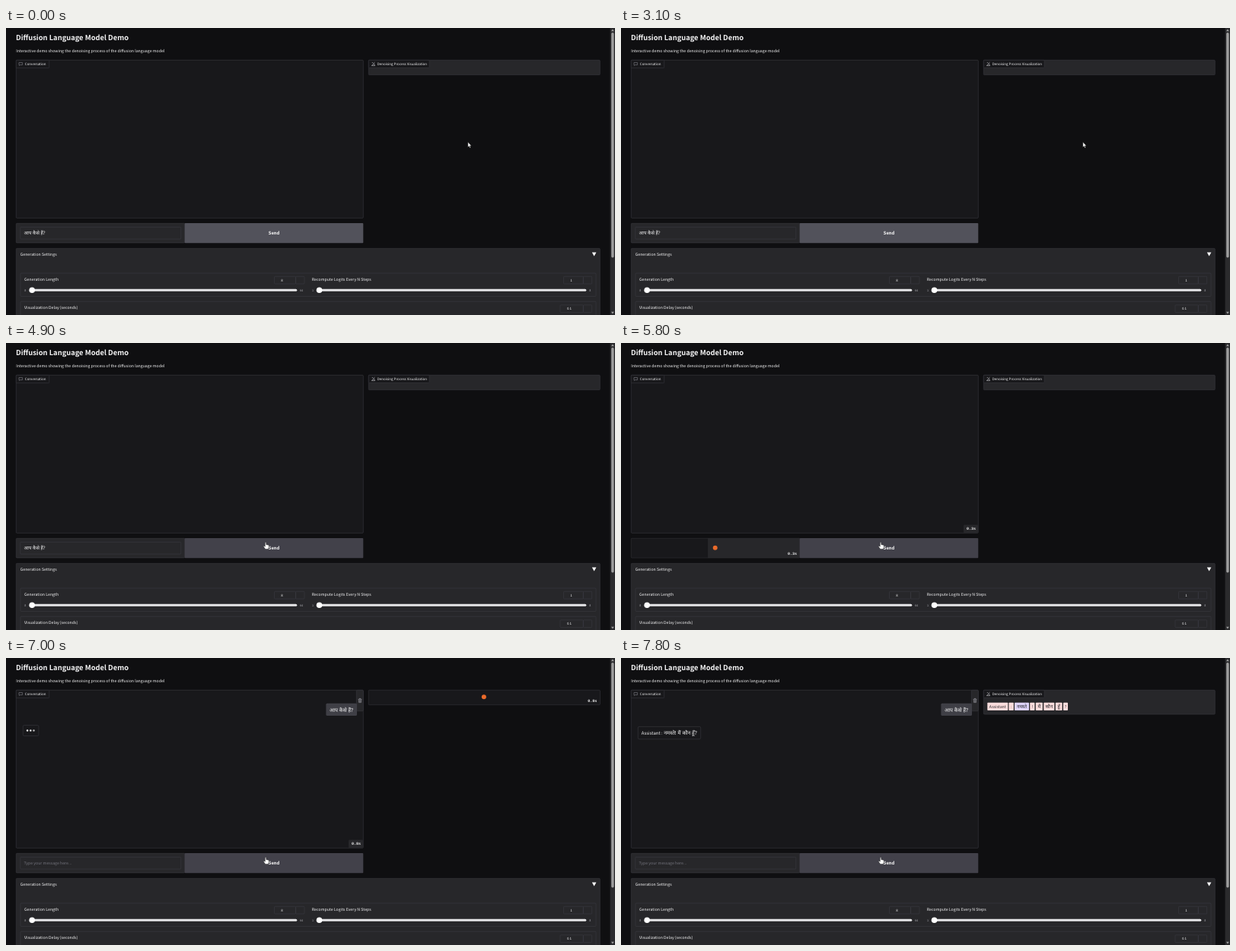
An HTML page for the animation above (8000 ms loop, 800 px wide and 378 px high).

```html
<!DOCTYPE html>
<html lang="en">
<head>
<meta charset="utf-8">
<title>Diffusion Language Model Demo</title>
<style>
html, body { margin: 0; width: 100%; height: 100%; overflow: hidden; background: #0f0f11; }
svg { display: block; width: 100vw; height: 100vh; }
text { font-family: "Noto Sans CJK SC", "Noto Sans CJK JP", "Noto Sans CJK", "Noto Sans", sans-serif;
  font-size: 5.22px; fill: #f4f4f5; text-rendering: geometricPrecision; white-space: pre; }
.title { font-size: 9.37px; font-weight: 700; }
.label { font-size: 4.48px; }
.send { font-size: 5.8px; font-weight: 700; fill: #fff; }
.tick { font-size: 3.73px; fill: #b4b4bb; }
.num { font-size: 4.48px; text-anchor: middle; }
.chat { font-size: 5.97px; }
.hint { fill: #73737c; }
.hindi { font-family: "Noto Sans", "Noto Sans Devanagari", sans-serif; font-size: 6.2px; }
.big { font-size: 6.9px; }
.mono { font-family: "Liberation Mono", monospace; font-size: 5px; font-weight: 700; }
.token { fill: #26262a; text-anchor: middle; }
.panel { fill: #27272a; stroke: #3a3a40; stroke-width: .6; }
.dark { fill: #18181b; stroke: #3a3a40; stroke-width: .6; }
.line { fill: none; stroke: #3f3f46; stroke-width: .5; }
.icon { fill: none; stroke: #a1a1aa; stroke-width: .6; }
</style>
</head>
<body>
<svg viewBox="0 0 800 378" preserveAspectRatio="none">
  <rect width="800" height="378" fill="#0f0f11"/>
  <text class="title" x="13" y="16.3">Diffusion Language Model Demo</text>
  <text x="13.2" y="32.4">Interactive demo showing the denoising process of the diffusion language model</text>

  <!-- conversation -->
  <rect class="dark" x="13.3" y="42.3" width="456" height="208" rx="1"/>
  <rect class="dark" x="13.3" y="42.3" width="43.4" height="10.4" rx="1"/>
  <path class="icon" d="M17 45.6h4.6v3h-3l-1 .9v-.9h-.6z" opacity=".75"/>
  <text class="label" x="24.8" y="49.3">Conversation</text>
  <g id="talk">
    <rect class="panel" x="460.3" y="42.3" width="9" height="27.5" rx="1"/>
    <path class="icon" d="M462.7 54.4h4.6M464.2 54.2v-.8h1.6v.8M463.3 54.6l.3 4h2.8l.3-4M464.5 55.6v2M465.5 55.6v2"/>
    <rect x="420.4" y="59.7" width="40.6" height="16.3" rx="1.6" fill="#3f3f46"/>
    <text class="hindi big" x="425" y="70.6">आप कैसे हैं?</text>
  </g>
  <g id="dots">
    <rect class="dark" x="22.3" y="88.6" width="20.6" height="14" rx="1.6"/>
    <circle cx="28.1" cy="95.6" r="1.25" fill="#f4f4f5"/>
    <circle cx="32.3" cy="95.6" r="1.25" fill="#f4f4f5"/>
    <circle cx="36.5" cy="95.6" r="1.25" fill="#f4f4f5"/>
  </g>
  <g id="reply">
    <rect class="dark" x="22.3" y="90.4" width="82.4" height="16.4" rx="1.6"/>
    <text class="chat" x="26.7" y="101.4">Assistant :</text>
    <text class="hindi big" x="56.3" y="101.4">नमस्ते! मैं कौन हूँ?</text>
  </g>
  <g id="chatTimer">
    <rect x="450" y="239.4" width="19" height="10.6" rx="1" fill="#27272a"/>
    <text class="mono timer" x="454" y="246.2"></text>
  </g>

  <!-- denoising panel -->
  <rect id="vis" class="panel" x="476.3" y="42.3" width="304" height="19.4" rx="1"/>
  <g id="visLabel">
    <rect class="dark" x="476.3" y="42.3" width="79.8" height="10.1" rx="1"/>
    <path class="icon" stroke="#e4e4e7" d="M480.4 49.6l2.6-2.8 1.6 2.8zM482.8 46.6l1.5-1.4M480.8 45.6h1.2" style="stroke:#d4d4d8"/>
    <text class="label" x="487.8" y="49.3">Denoising Process Visualization</text>
  </g>
  <g id="visLoad">
    <rect class="bar" x="476.6" y="42.6" width="0" height="18.8" fill="#18181b"/>
    <circle cx="627.8" cy="51.2" r="3" fill="#ea6a2a"/>
    <text class="mono timer" x="764.3" y="57.7"></text>
  </g>
  <g id="tokens"></g>

  <!-- message row -->
  <rect class="panel" x="13.3" y="257.3" width="221.5" height="25.6" rx="1"/>
  <rect class="line" x="18.8" y="262.2" width="211" height="15.8" rx="1"/>
  <text id="typed" class="hindi" x="23.6" y="272.2">आप कैसे हैं?</text>
  <text id="hint" class="hint" x="23.4" y="272">Type your message here...</text>
  <g id="msgLoad">
    <rect x="13.6" y="257.6" width="221" height="25" fill="#27272a"/>
    <rect class="bar" x="13.6" y="257.6" width="0" height="25" fill="#18181b"/>
    <circle cx="123.7" cy="269.8" r="3" fill="#ea6a2a"/>
    <text class="mono timer" x="219" y="278.6"></text>
  </g>
  <rect id="button" x="234.7" y="257" width="234.6" height="26.2" rx="1"/>
  <text class="send" x="344.8" y="272.3">Send</text>

  <!-- settings -->
  <rect class="panel" x="13.3" y="290.3" width="767" height="100" rx="1"/>
  <text x="18.7" y="300">Generation Settings</text>
  <path d="M769.8 295.6h5.6l-2.8 5z" fill="#fff"/>
  <rect class="line" x="19" y="323" width="756" height="30.4" rx="1"/>
  <rect class="line" x="19" y="360.2" width="756" height="30" rx="1"/>
  <text x="24" y="332.8">Generation Length</text>
  <text x="401.8" y="332.8">Recompute Logits Every N Steps</text>
  <text x="24" y="370.2">Visualization Delay (seconds)</text>
  <g id="fields"></g>
  <text class="tick" x="24.3" y="346.7">8</text>
  <text class="tick" x="386" y="346.7">64</text>
  <text class="tick" x="402" y="346.7">1</text>
  <text class="tick" x="766.2" y="346.7">8</text>
  <g fill="#e6e6e8">
    <rect x="32" y="343.8" width="350.3" height="3" rx="1.5"/>
    <rect x="409" y="343.8" width="353.3" height="3" rx="1.5"/>
  </g>
  <g fill="#fff">
    <circle cx="34.2" cy="345.2" r="3.8"/>
    <circle cx="411.6" cy="345.2" r="3.8"/>
  </g>

  <!-- scrollbar -->
  <rect x="793.6" width="6.4" height="378" fill="#2b2b2d"/>
  <rect x="795.2" y="6" width="3.4" height="296.5" rx="1.7" fill="#9f9f9f"/>
  <path d="M795 4.2l1.9-2.6 1.9 2.6zM795 373.8h3.8l-1.9 2.6z" fill="#9f9f9f"/>

  <path id="arrow" d="M0 0v6.7l1.5-1.4 1 2.3 1.1-.5-1-2.2h2z" fill="#fff" stroke="#000" stroke-width=".4"/>
  <path id="hand" d="M-.7.7q.8-1 1.5 0v2.7l2.8.7q.7.2.7 1v2.2l-.8 2.1h-3.8l-2.5-3.3q-.1-1 .9-.8l1.2.9z"
    fill="#fff" stroke="#000" stroke-width=".4"/>
</svg>
<script>
const LOOP = 8000, MOVE = 4600, HOVER = 4900, SUBMIT = 5500, GENERATE = 6200, DONE = 7800;
const byId = id => document.getElementById(id);
const show = (id, on) => byId(id).setAttribute("display", on ? "inline" : "none");
const clamp = v => Math.max(0, Math.min(1, v));

// number boxes with a reset cell: left, top, value
byId("fields").innerHTML = [[352.5, 327.2, "8", 380.6], [732.5, 327.2, "1", 758.3], [728, 364.8, "0.1", 758.3]]
  .map(([x, y, value, split]) => `
    <rect class="line" x="${x}" y="${y}" width="${split - x}" height="9.8" rx="1"/>
    <rect class="line" x="${split}" y="${y}" width="11.4" height="9.8" rx="1"/>
    <text class="num" x="${x + (value === "0.1" ? 12 : 10)}" y="${y + 6.5}">${value}</text>`).join("");

const PINK = "#fbdcdc", LILAC = "#ddd3fa";
byId("tokens").innerHTML = [
  ["Assistant", 481.3, 27, PINK], [":", 509.4, 6.4, PINK], ["नमस्ते", 517, 19, LILAC], ["!", 537.2, 6.2, PINK],
  ["मैं", 544.8, 9, PINK], ["कौन", 555.3, 14, PINK], ["हूँ", 570.8, 8.8, PINK], ["?", 581, 6, PINK]
].map(([word, x, w, fill]) => `
    <rect x="${x}" y="58.8" width="${w}" height="10.2" rx=".8" fill="${fill}"/>
    <text class="token${word.charCodeAt(0) > 255 ? " hindi" : ""}" x="${x + w / 2}" y="66">${word}</text>`).join("");

const timers = document.querySelectorAll(".timer");
const msgBar = document.querySelector("#msgLoad .bar");
const visBar = document.querySelector("#visLoad .bar");
const dots = document.querySelectorAll("#dots circle");

function drawCursor(t) {
  const p = clamp((t - MOVE) / (HOVER - MOVE));
  const ease = p * p * (3 - 2 * p);
  const x = 606.8 + (341 - 606.8) * ease, y = 150.3 + (262 - 150.3) * ease;
  const over = x < 469 && y > 257;
  for (const id of ["arrow", "hand"]) byId(id).setAttribute("transform", `translate(${x} ${y})`);
  show("arrow", !over);
  show("hand", over);
  byId("button").setAttribute("fill", over ? "#42414a" : "#52525b");
}

function draw(t) {
  const sending = t >= SUBMIT && t < GENERATE;
  const working = t >= GENERATE && t < DONE;
  const done = t >= DONE;
  const elapsed = (t - (sending ? SUBMIT : GENERATE)) / 1000;

  show("typed", t < SUBMIT);
  show("hint", t >= GENERATE);
  show("msgLoad", sending);
  show("chatTimer", sending || working);
  show("talk", t >= GENERATE);
  show("dots", working);
  show("visLoad", working);
  show("visLabel", !working);
  show("reply", done);
  show("tokens", done);
  byId("vis").setAttribute("height", done ? 31.8 : 19.4);

  if (sending || working) timers.forEach(el => { el.textContent = elapsed.toFixed(1) + "s"; });
  msgBar.setAttribute("width", 221 * clamp(elapsed / 0.66));
  visBar.setAttribute("width", 303.4 * clamp(elapsed / 0.79));
  dots.forEach((dot, i) => {
    const phase = Math.max(0, elapsed - i * 0.2) / 1.5;
    dot.setAttribute("opacity", 0.4 + 0.3 * (1 - Math.cos(phase * 2 * Math.PI)));
  });
  drawCursor(t);
}

const start = performance.now();
function tick() {
  const t = (performance.now() - start) % LOOP;
  draw(Math.floor(t / 100) * 100);
  requestAnimationFrame(tick);
}
tick();
</script>
</body>
</html>
```
